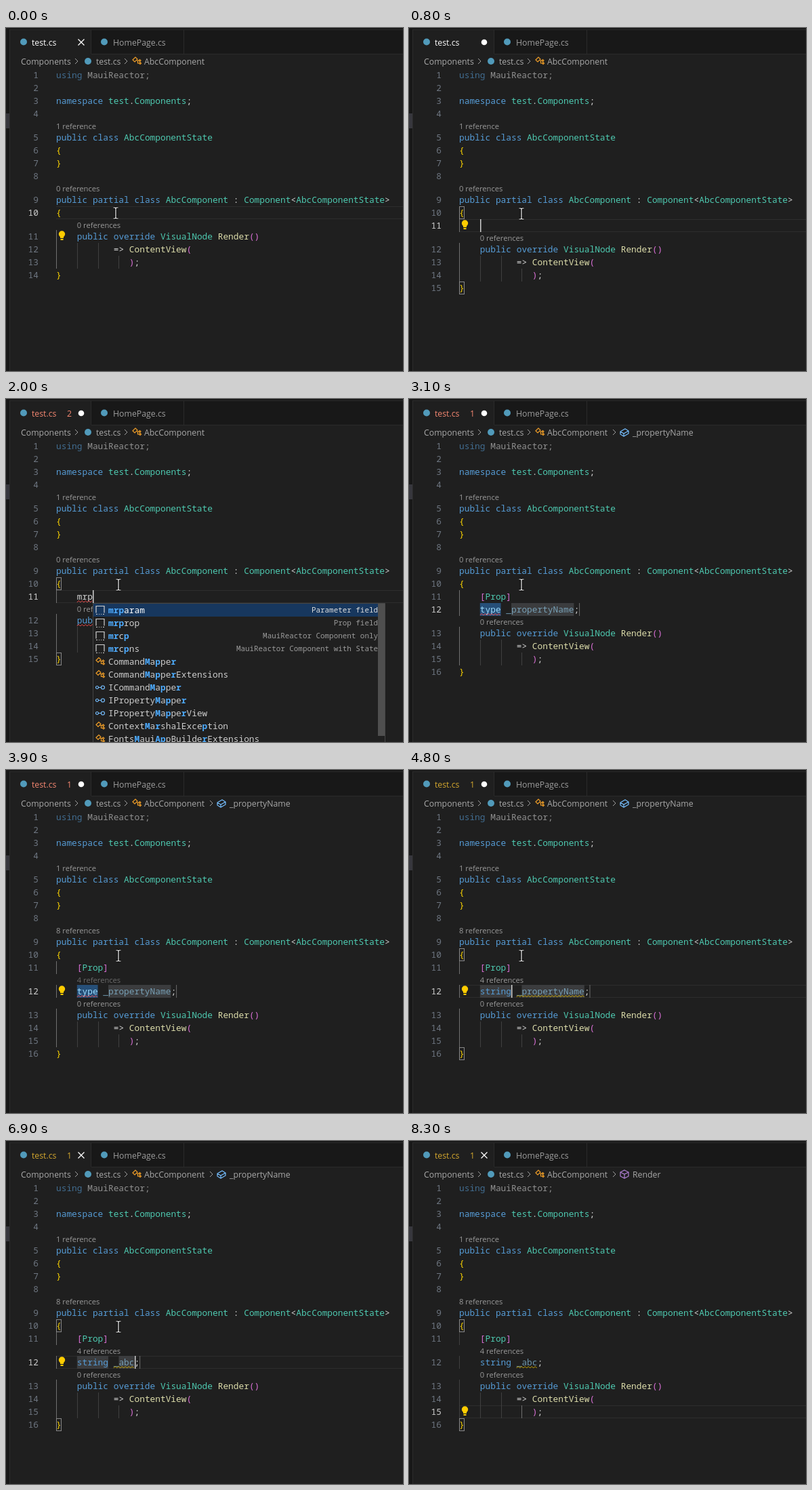
An HTML page that plays this animation: 586 by 506 pixels, repeating every 8.5 s.

```html
<!DOCTYPE html>
<html lang="en">
<head>
<meta charset="utf-8">
<title>Code editor</title>
<style>
  html, body { margin: 0; width: 100%; height: 100%; overflow: hidden; background: #1f1f1f; }
  svg { display: block; width: 586px; height: 506px; }
  text { font: 12.83px "Noto Sans Mono", monospace; }
  .ui { font: 12.3px "Open Sans", sans-serif; }
  .lens { font: 11.2px "Open Sans", sans-serif; }
  .detail { font-size: 10.9px; }
  .hit { fill: #4daafc; font-weight: 700; }
</style>
</head>
<body>
<svg id="stage" viewBox="0 0 586 506"></svg>
<script>
const LOOP = 8500, CHAR = 7.7, LEFT = 74, ROW = 19;
const RED = '#f48771', YELLOW = '#d3a72e', WHITE = '#ffffff';
const SELECT = '#264f78', HOLDER = '#3b3c3e';

const HEAD = [
  'using MauiReactor;', '', 'namespace test.Components;', '',
  '~1 reference', 'public class AbcComponentState', '{', '}', ''
];
const TAIL = [
  '~    0 references', '    public override VisualNode Render()',
  '           => ContentView(', '              );', '}'
];

const palette = {};
const paint = (color, words) => words.split(' ').forEach(w => palette[w] = color);
paint('#569cd6', 'using namespace public class partial override string');
paint('#4ec9b0', 'test Components AbcComponentState AbcComponent Component VisualNode Prop');
paint('#dcdcaa', 'Render ContentView');
paint('#ffd700', '{ }');
paint('#da70d6', '( ) [ ]');
paint('#9cdcfe', 'type s st str stri strin');

const SUGGEST = [
  ['snippet', '*mrp*aram', 'Parameter field'],
  ['snippet', '*mrp*rop', 'Prop field'],
  ['snippet', '*mr*c*p*', 'MauiReactor Component only'],
  ['snippet', '*mr*c*p*ns', 'MauiReactor Component with State'],
  ['cls', 'Command*M*a*p*pe*r*'],
  ['cls', 'Command*M*a*p*pe*r*Extensions'],
  ['face', 'ICommand*M*a*p*pe*r*'],
  ['face', 'IProperty*M*a*p*pe*r*'],
  ['face', 'IProperty*M*a*p*pe*r*View'],
  ['cls', 'Context*M*a*r*shalExce*p*tion'],
  ['cls', 'Fonts*M*aui*Ap*pBuilde*r*Extensions']
];

const ICONS = {
  cls: ['#ee9d28', 'M-6-2l4-4 3 3-4 4zM0-1h3M1.5-1v4h2M3-1l1.5-1.5 1.5 1.5-1.5 1.5zM3.5 3l1.5-1.5 1.5 1.5-1.5 1.5z'],
  face: ['#75beff', 'M-6.5 0a2 2 0 1 0 4 0a2 2 0 1 0-4 0M-2.5 0h4M1.5 0a2.5 2.5 0 1 0 5 0a2.5 2.5 0 1 0-5 0'],
  field: ['#75beff', 'M-6-1l7-4 5 3v4l-7 4-5-3zM-6-1l5 3 7-4M-1 2v4'],
  method: ['#b180d7', 'M0-6l6 3v6l-6 3-6-3v-6zM-6-3l6 3 6-3M0 0v6'],
  snippet: ['#d0d0d0', 'M-6 4v-10h12v10M-6 6h2M-2 6h1M1 6h1M4 6h2']
};

// Each step changes only what it names; the rest carries over.
const STEPS = [
  [0, { mouse: [162, 273], tone: WHITE, count: '', dirty: 0, body: [], refs: 0, cur: 10, bulb: 11,
        caret: null, box: 0, crumb: null, popup: -1, field: null, active: 0 }],
  [200, { mouse: [164, 273], box: 1, caret: [10, 1] }],
  [300, { mouse: [165, 274] }],
  [400, { mouse: [166, 274] }],
  [800, { dirty: 1, body: ['    '], cur: 11, bulb: 11, caret: [11, 4] }],
  [1300, { caret: null }],
  [1600, { body: ['    m'], caret: [11, 5], bulb: 0 }],
  [1700, { body: ['    mr'], caret: [11, 6] }],
  [1900, { body: ['    mrp'], caret: [11, 7], popup: 0, tone: RED, count: 2 }],
  [2100, { popup: 1 }],
  [2300, { popup: -1, cur: 12, caret: null, box: 0, field: { type: 'type', name: 'propertyName', sel: 1, holders: 1 } }],
  [2600, { count: 1, wave: 'type' }],
  [3100, { crumb: ['field', '_propertyName'] }],
  [3200, { bulb: 12 }],
  [3400, { lens: 1 }],
  [3600, { refs: 8 }],
  [3900, { fadeLens: 1 }],
  ...'string'.split('').map((c, i) => [4000 + i * 100, {
    box: 1, bulb: 0, caret: [12, 5 + i],
    field: { type: 'string'.slice(0, i + 1), name: 'propertyName', holders: 1 }
  }]),
  [4600, { wave: 'name', tone: YELLOW, fadeLens: 0 }],
  [4700, { bulb: 12 }],
  [5200, { box: 0, caret: null, field: { type: 'string', name: 'propertyName', sel: 2, holders: 1 } }],
  [5400, { bulb: 0 }],
  [5700, { bulb: 12 }],
  ...[6100, 6200, 6400].map((t, i) => [t, {
    box: 1, bulb: 0, caret: [12, 13 + i],
    field: { type: 'string', name: 'abc'.slice(0, i + 1), holders: 1 }
  }]),
  [6600, { bulb: 12 }],
  [6900, { dirty: 0 }],
  [7300, { mouse: [180, 320] }],
  [7400, { mouse: [205, 398] }],
  [7500, { cur: 15, caret: [15, 16], bulb: 0, active: 12, field: { type: 'string', name: 'abc' } }],
  [7600, { mouse: [232, 486] }],
  [7700, { mouse: null }],
  [7900, { crumb: ['method', 'Render'] }],
  [8100, { bulb: 15 }],
  [8300, { caret: null }]
];

const stage = document.getElementById('stage');
const frames = [];
STEPS.reduce((state, [t, change]) => {
  const next = { ...state, ...change };
  frames.push([t, next]);
  return next;
}, {});

const colX = c => LEFT + c * CHAR;
const esc = s => String(s).replace(/&/g, '&amp;').replace(/</g, '&lt;');
const text = (x, y, s, fill, more = '') => `<text x="${x}" y="${y}" fill="${fill}" ${more}>${esc(s)}</text>`;
const ui = (x, y, s, fill, more = '') => text(x, y, s, fill, 'class="ui" ' + more);
const rect = (x, y, w, h, fill) => `<rect x="${x}" y="${y}" width="${w}" height="${h}" fill="${fill}"/>`;
const path = (d, stroke, more = '') => `<path d="${d}" fill="none" stroke="${stroke}" ${more}/>`;
const dot = (x, y, r, fill) => `<circle cx="${x}" cy="${y}" r="${r}" fill="${fill}"/>`;
const icon = (kind, x, y) => path(ICONS[kind][1], ICONS[kind][0], `transform="translate(${x} ${y})" stroke-width="1.2"`);
const chevron = x => path(`M${x - 2} 45l4 4-4 4`, '#a0a0a0');

function wave(col, len, y, color) {
  let d = `M${colX(col)} ${y}`;
  for (let i = 0; i < Math.round(len * CHAR / 2.5); i++) d += `l2.5 ${i % 2 ? 2.5 : -2.5}`;
  return path(d, color);
}

function bulb(y) {
  return dot(82.5, y - 2, 4.7, '#ffcc00') + rect(80, y + 1, 5, 3, '#ffcc00') + rect(80.5, y + 5, 4, 2, '#ffcc00');
}

function pointer([x, y]) {
  const d = `M${x - 3.5} ${y - 8}h2.5l1 1 1-1h2.5M${x} ${y - 7}v14M${x - 3.5} ${y + 8}h2.5l1-1 1 1h2.5`;
  return path(d, '#000', 'stroke-width="3"') + path(d, '#fff', 'stroke-width="1.2"');
}

function header(s) {
  let out = rect(0, 0, 586, 38, '#181818') + rect(0, 0, 5, 506, '#181818') +
    rect(0, 126, 5, 22, '#37373d') + rect(5, 2, 1, 504, '#2b2b2b') +
    rect(5, 2, 581, 1, '#2b2b2b') + rect(6, 3, 120, 36, '#1f1f1f') +
    rect(125, 3, 1, 35, '#2b2b2b') + rect(262, 3, 1, 35, '#2b2b2b') + rect(126, 38, 460, 1, '#2b2b2b');
  out += dot(26, 20.5, 5, '#519aba') + ui(38, 25.5, 'test.cs', s.tone) + ui(90, 25.5, s.count, s.tone) +
    dot(145, 20.5, 5, '#519aba') + ui(158, 25.5, 'HomePage.cs', '#9d9d9d', 'font-style="italic"');
  out += s.dirty ? dot(111, 21, 4.3, '#fff') : path('M106.5 16.5l9 9m0-9l-9 9', '#fff', 'stroke-width="1.3"');
  out += ui(22, 53.5, 'Components', '#a9a9a9') + chevron(104) + dot(121, 49, 5, '#519aba') +
    ui(133, 53.5, 'test.cs', '#a9a9a9') + chevron(177) + icon('cls', 193, 49) + ui(204, 53.5, 'AbcComponent', '#a9a9a9');
  if (s.crumb) out += chevron(303) + icon(s.crumb[0], 318, 49) + ui(330, 53.5, s.crumb[1], '#a9a9a9');
  return out;
}

function code(line, y, faded) {
  return [...line.matchAll(/\w+|[^\w\s]/g)].map(m => {
    const name = m[0][0] === '_';
    const fill = name ? '#9cdcfe' : palette[m[0]] || '#d4d4d4';
    return text(colX(m.index), y, m[0], fill, faded || name ? 'opacity=".62"' : '');
  }).join('');
}

function popup(selected) {
  let out = rect(128, 301, 432, 206, '#202020') + path('M128.5 506V301.5H559.5V506', '#454545') +
    rect(129, 302 + selected * ROW, 420, ROW, '#17375e');
  SUGGEST.forEach(([kind, label, detail], i) => {
    const y = 311 + i * ROW, on = i === selected;
    const html = label.split('*').map((p, k) => k % 2 ? `<tspan class="hit">${p}</tspan>` : p).join('');
    out += icon(kind, 139, y + .5) + `<text x="151" y="${y + 5}" fill="${on ? '#fff' : '#ccc'}">${html}</text>`;
    if (detail) out += text(549, y + 4, detail, on ? '#dddddd' : '#9a9a9a', 'class="detail" text-anchor="end"');
  });
  return out + rect(549, 302, 10, 195, '#4f4f4f');
}

function fieldMarks(f, y) {
  if (!f.holders) return '';
  const at = 6 + f.type.length, end = at + f.name.length + 1;
  const mark = (c, len, on) => rect(colX(c), y, len * CHAR, ROW, on ? SELECT : HOLDER);
  return mark(4, f.type.length, f.sel === 1) + mark(at, f.name.length, f.sel === 2) +
    rect(colX(end), y, 1, ROW, '#6a6a6a');
}

function render(s) {
  const f = s.field;
  const body = f ? ['    [Prop]', ...(s.lens ? ['~    4 references'] : []), `    ${f.type} _${f.name};`] : s.body;
  const rows = [...HEAD, `~${s.refs} references`,
    'public partial class AbcComponent : Component<AbcComponentState>', '{', ...body, ...TAIL];
  const tops = [];
  let y = 60, n = 0, under = '', over = '';

  for (const row of rows) {
    if (row[0] === '~') {
      const label = row.slice(1).trim(), dim = s.fadeLens && label[0] === '4';
      over += text(colX(row.length - 1 - label.length), y + 13, label, dim ? '#6a6a6a' : '#999', 'class="lens"');
      y += 16;
      continue;
    }
    tops[++n] = y;
    const indent = row.search(/\S|$/), here = n === s.cur;
    if (here && !(f && f.sel)) {
      under += rect(LEFT, y, 512, 1, '#2d2d2d') + rect(LEFT, y + ROW - 1, 512, 1, '#2d2d2d');
    }
    for (let c = 0; c < indent; c += 4) {
      under += rect(Math.round(colX(c)), y, 1, ROW, c === s.active ? '#707070' : '#404040');
    }
    over += text(48, y + 14, n, here ? '#cccccc' : '#6e7681', 'text-anchor="end"') + code(row, y + 14, n === 1);
    y += ROW;
  }

  if (s.box) {
    for (const k of [10, n]) {
      under += `<rect x="74.5" y="${tops[k] + .5}" width="7" height="18" fill="none" stroke="#888"/>`;
    }
  }
  if (f) {
    under += fieldMarks(f, tops[12]);
    if (s.wave === 'type') over += wave(4, f.type.length, tops[12] + 18, '#f14c4c');
    if (s.wave === 'name') over += wave(5 + f.type.length, f.name.length + 1, tops[12] + 18, '#cca700');
  } else if (s.count === 2) {
    over += wave(4, 3, tops[11] + 18, '#f14c4c') + wave(4, 6, tops[12] + 18, '#f14c4c');
  }
  if (s.bulb) over += bulb(tops[s.bulb] + 8);
  if (s.caret) over += rect(Math.round(colX(s.caret[1])), tops[s.caret[0]], 1.5, ROW, '#d0d0d0');
  if (s.popup >= 0) over += popup(s.popup);
  if (s.mouse) over += pointer(s.mouse);
  stage.innerHTML = rect(0, 0, 586, 506, '#1f1f1f') + header(s) + under + over;
}

let shown = -1;
const start = performance.now();
function tick(now) {
  const t = Math.max(0, now - start) % LOOP;
  let i = frames.length - 1;
  while (frames[i][0] > t) i--;
  if (i !== shown) render(frames[shown = i][1]);
  requestAnimationFrame(tick);
}
tick(start);
</script>
</body>
</html>
```
